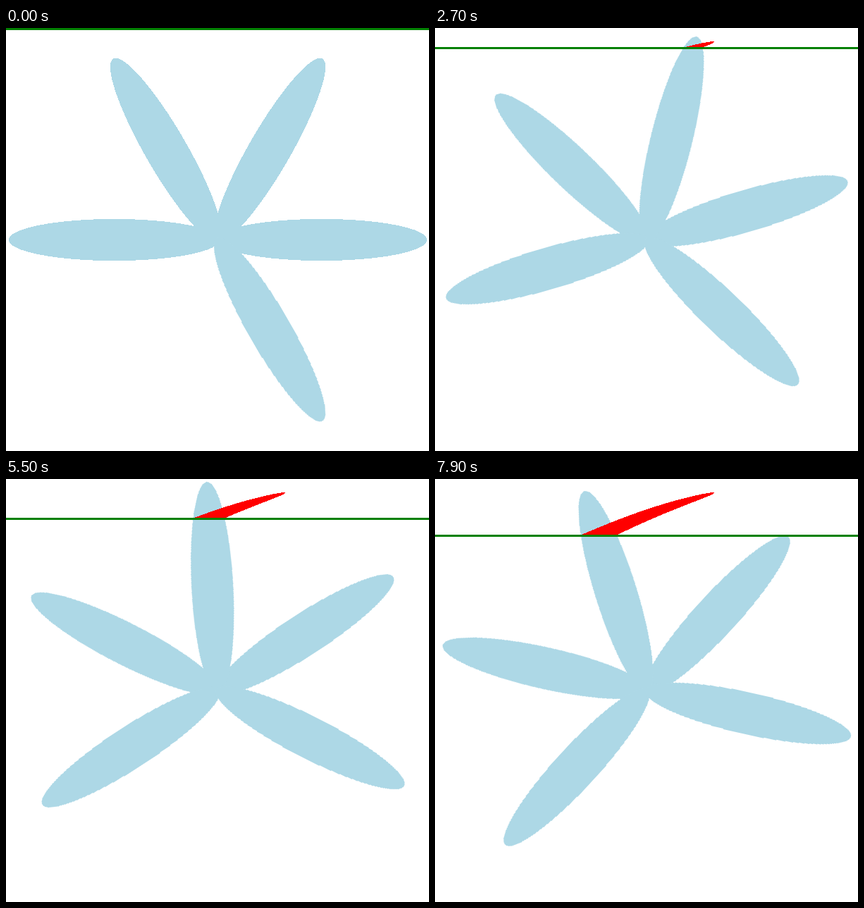
These frames come from a looping animation (600x600 px, 8000 ms). An HTML page:

```html
<!DOCTYPE html>
<html lang="en">
<head>
<meta charset="utf-8">
<title>Slit scan of a turning flower</title>
<style>
  html, body { margin: 0; width: 100%; height: 100%; overflow: hidden; background: #fff; }
  .stage { position: relative; width: 600px; height: 600px; overflow: hidden; }
  svg { position: absolute; left: 0; top: 0; display: block; shape-rendering: crispEdges; }
  .flower { fill: #add8e6; transform-origin: 300.5px 300.5px; animation: turn 8s steps(80) infinite; }
  .scan { position: absolute; left: 0; top: 0; width: 600px; overflow: hidden; animation: reveal 8s steps(80) infinite; }
  .scan path { fill: #f00; }
  .line { position: absolute; left: 0; top: 0; width: 600px; height: 3px; background: #008000; animation: sweep 8s steps(80) infinite; }
  @keyframes turn { from { transform: rotate(0deg); } to { transform: rotate(-48deg); } }
  @keyframes reveal { from { height: 0; } to { height: 80px; } }
  @keyframes sweep { from { top: 0; } to { top: 80px; } }
</style>
</head>
<body>
<div class="stage">
  <svg width="600" height="600"><g class="flower"></g></svg>
  <div class="scan"><svg width="600" height="80"><path></path></svg></div>
  <div class="line"></div>
</div>
<script>
  const CENTER = 300.5, DIST = 147, A = 149.8, B = 29.6;
  const ROWS = 80, TURN = 0.6;
  const angles = [0, 60, 120, 180, 300];

  document.querySelector('.flower').innerHTML = angles.map(deg =>
    `<ellipse cx="${CENTER + DIST}" cy="${CENTER}" rx="${A}" ry="${B}" transform="rotate(${-deg} ${CENTER} ${CENTER})"/>`
  ).join('');

  // Where a horizontal row crosses a petal, or null if it misses.
  function chord(deg, row) {
    const t = deg * Math.PI / 180, c = Math.cos(t), s = Math.sin(t);
    const v = CENTER - row - 0.5, p = v * s - DIST, q = v * c;
    const a2 = A * A, b2 = B * B;
    const k2 = c * c / a2 + s * s / b2;
    const k1 = c * p / a2 - s * q / b2;
    const k0 = p * p / a2 + q * q / b2 - 1;
    const disc = k1 * k1 - k2 * k0;
    if (disc <= 0) return null;
    const root = Math.sqrt(disc);
    return [CENTER + (-k1 - root) / k2, CENTER + (-k1 + root) / k2];
  }

  // Each row keeps the petal as it stood when the line reached it.
  let scan = '';
  for (let row = 0; row < ROWS; row++) {
    for (const deg of angles) {
      const hit = chord(deg + row * TURN, row);
      if (hit) scan += `M${hit[0].toFixed(2)} ${row}H${hit[1].toFixed(2)}v1H${hit[0].toFixed(2)}z`;
    }
  }
  document.querySelector('.scan path').setAttribute('d', scan);
</script>
</body>
</html>
```
